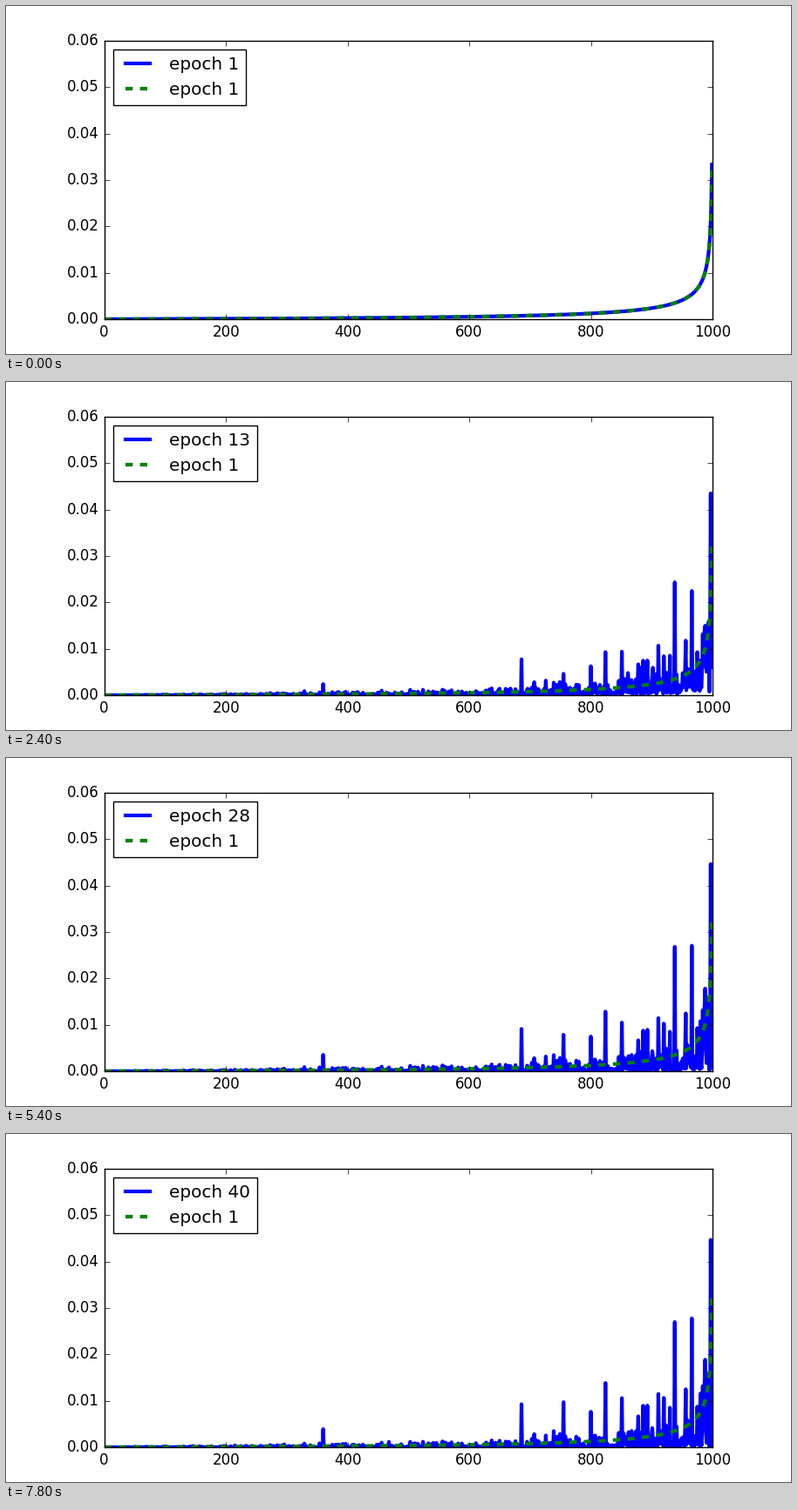
A matplotlib script that plays this animation: 900 px wide and 400 px high, repeating every 8000 ms.

```python
import matplotlib.pyplot as plt
import numpy as np
from matplotlib.animation import FuncAnimation

plt.style.use("classic")

EPOCHS = 40
N = 1000
x = np.arange(N)
p = x / N

# Sorted log-normal curve; the bracket approximates the normal quantile
z = (p ** 0.135 - (1 - p) ** 0.135) / 0.1975
base = 3.6e-4 * np.exp(1.475 * z)

# Main spikes: index, final height, rise time in epochs
SPIKES = [
    (360, 0.0042, 15), (686, 0.0093, 7), (755, 0.0150, 40), (800, 0.0077, 8),
    (824, 0.0145, 13), (851, 0.0106, 6), (886, 0.0090, 8), (911, 0.0115, 5),
    (920, 0.0108, 10), (938, 0.0270, 5.5), (956, 0.0125, 5),
    (966, 0.0280, 8.5), (988, 0.0200, 18), (997, 0.0447, 4),
    (998, 0.0060, 5), (999, 0, 7),
]

# Every other entry drifts at random up to its own ceiling
rng = np.random.default_rng(7)
early, late = rng.normal(size=(2, N))
spread = 0.7 + 0.35 * rng.exponential(size=N)
ceiling = np.minimum(base * (1.5 + 2 * (1 - p)) * spread,
                     rng.uniform(0.011, 0.0158, N))
ceiling = np.maximum(ceiling, base)


def values(epoch):
    s = np.log(epoch)
    walk = early * np.cos(0.3 * s) + late * np.sin(0.3 * s)
    y = np.minimum(base * np.exp(0.45 * s * walk - 0.1 * s * s), ceiling)
    for i, height, rise in SPIKES:
        y[i] = height + (base[i] - height) * np.exp((1 - epoch) / rise)
    return y


fig, ax = plt.subplots(figsize=(9, 4), dpi=100, facecolor="white")
fig.subplots_adjust(left=0.1251, right=0.9, bottom=0.1, top=0.9)
line, = ax.plot(x, values(1), "b-", lw=3, label="epoch 1")
ax.plot(x, base, "g--", lw=3, label="epoch 1")
ax.set_xlim(0, 1000)
ax.set_ylim(0, 0.06)
ax.set_xticks(range(0, 1001, 200))
ax.set_yticks(np.arange(7) * 0.01)
label = ax.legend(loc="upper left").get_texts()[0]


def draw(frame):
    epoch = frame + 1
    line.set_ydata(values(epoch))
    label.set_text(f"epoch {epoch}")
    return line, label


anim = FuncAnimation(fig, draw, frames=EPOCHS, interval=200, repeat=True, blit=False)
plt.show()
```
